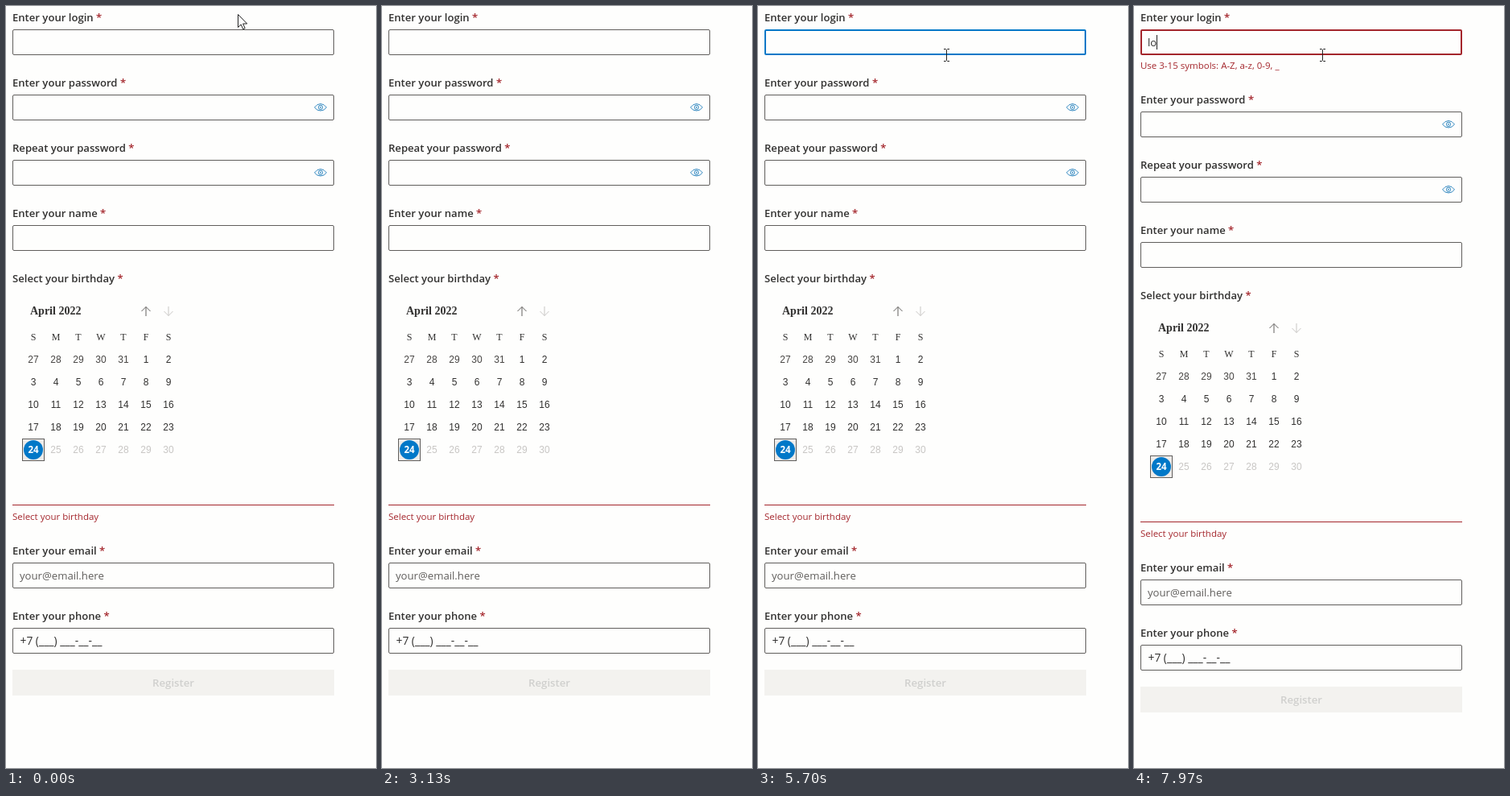
An HTML page that plays this animation: 460x946 px, repeating every 8 s.

```html
<!DOCTYPE html>
<html lang="en">
<head>
<meta charset="utf-8">
<title>Registration form</title>
<style>
  :root {
    --paper: #fefefd; --ink: #323130; --soft: #605e5c; --edge: #605e5c;
    --faint: #c8c6c4; --tint: #f3f2ef; --cell: #edebe9; --blue: #0078c8; --red: #a4262c;
  }
  html, body { margin: 0; width: 100%; height: 100%; overflow: hidden; background: var(--paper); }
  svg { display: block; width: 100%; height: 100%; }
  text { font-family: "Open Sans", "Noto Sans", sans-serif; font-size: 13.15px; fill: var(--ink); white-space: pre; }
  .label { font-size: 13.1px; font-weight: 600; }
  .star { fill: var(--red); }
  .hint { font-size: 11.5px; fill: var(--red); }
  .placeholder { fill: var(--soft); }
  .phone { font-size: 13.8px; }
  .box { fill: none; stroke: var(--edge); }
  .mid { text-anchor: middle; }
  .month { font: bold 14px "Liberation Serif", serif; }
  .weekday { font: 12px "Liberation Serif", serif; }
  .day { font: 12px "Liberation Sans", sans-serif; }
  .outer { fill: #484644; }
  .off { fill: var(--faint); }
  .today { font-size: 11.5px; font-weight: 700; fill: #fff; }
  .register { font-weight: 600; font-size: 13.2px; fill: #d0d0ce; }
  .icon { fill: none; stroke-width: 1; }
  .eye { stroke: #2f86bf; }

  .anim, .anim * { animation-duration: 8s; animation-iteration-count: infinite; animation-timing-function: step-end; }
  #lower { animation-name: shift; }
  #login { animation-name: outline; }
  #ring { fill: none; stroke-width: 2; animation-name: ring; }
  #hint { animation-name: slide; }
  #caret { fill: #222; animation: blink 8s infinite step-end, advance 8s infinite step-end; }
  #first { animation-name: typeFirst; }
  #second { animation-name: typeSecond; }
  #arrow { animation-name: arrow; animation-timing-function: ease-in-out; }
  #beam { animation-name: beam; animation-timing-function: ease-out; }

  @keyframes shift { 0% { transform: none } 90.81%, 100% { transform: translateY(21px) } }
  @keyframes outline { 0% { opacity: 1 } 48.75%, 100% { opacity: 0 } }
  @keyframes ring {
    0% { stroke: transparent }
    48.75% { stroke: var(--blue) }
    90.81%, 100% { stroke: var(--red) }
  }
  @keyframes slide {
    0% { opacity: 0; transform: translateY(-20px) }
    90.81% { opacity: 0; transform: translateY(-20px); animation-timing-function: cubic-bezier(.1, .9, .2, 1) }
    95.4%, 100% { opacity: 1; transform: none }
  }
  @keyframes blink {
    0%, 55.4%, 68.6%, 81.9% { opacity: 0 }
    48.75%, 62%, 75.25%, 88.5%, 100% { opacity: 1 }
  }
  @keyframes advance {
    0% { transform: none }
    88.5% { transform: translateX(3px) }
    95%, 100% { transform: translateX(11px) }
  }
  @keyframes typeFirst { 0% { visibility: hidden } 88.5%, 100% { visibility: visible } }
  @keyframes typeSecond { 0% { visibility: hidden } 95%, 100% { visibility: visible } }
  @keyframes arrow {
    0%, .4% { transform: translate(288px, 10px); opacity: 1 }
    2.6% { transform: translate(300px, -25px); opacity: 1 }
    43% { transform: translate(254px, -25px); opacity: 1 }
    47% { transform: translate(236px, 28px); opacity: 1; animation-timing-function: step-start }
    47.01%, 100% { transform: translate(236px, 28px); opacity: 0 }
  }
  @keyframes beam {
    0% { transform: translate(236px, 28px); opacity: 0; animation-timing-function: step-end }
    47% { transform: translate(236px, 28px); opacity: 1 }
    48.5%, 52.5% { transform: translate(232px, 56px); opacity: 1 }
    54%, 100% { transform: translate(234px, 61px); opacity: 1 }
  }
</style>
</head>
<body>
<svg id="stage" viewBox="0 0 460 946" xmlns="http://www.w3.org/2000/svg"></svg>
<script>
  const text = (x, y, kind, value) => `<text x="${x}" y="${y}" class="${kind}">${value}</text>`;
  const label = (y, value) => text(8, y, 'label', `${value} <tspan class="star">*</tspan>`);
  const box = (y, id = '') => `<rect ${id && `id="${id}"`} class="box" x="8.5" y="${y + .5}" width="399" height="31" rx="1.5"/>`;
  const field = (y, title, inner = '') => label(y + 19, title) + box(y + 29) + inner;
  const eye = y => `<g class="icon eye" transform="translate(391 ${y})">
    <path d="M-7.5 .5Q-4.5 -4 0 -4T7.5 .5Q4.5 4.5 0 4.5T-7.5 .5Z"/><circle cy=".3" r="2.6"/>
    <circle cy=".3" r=".6"/></g>`;

  function calendar() {
    let out = text(30, 383, 'month', 'April 2022');
    out += `<path class="icon" stroke="var(--edge)" d="M174 385V373.5M168.5 379L174 373.5L179.5 379"/>
      <path class="icon" stroke="var(--faint)" d="M202 373V384.5M196.5 379L202 384.5L207.5 379"/>`;
    [...'SMTWTFS'].forEach((name, i) => out += text(34 + 28 * i, 415, 'weekday mid', name));
    out += `<rect x="20.5" y="537.5" width="27" height="27" fill="var(--cell)" stroke="var(--edge)"/>
      <circle cx="34" cy="551" r="12" fill="var(--blue)"/>`;
    for (let i = 0; i < 35; i++) {
      const day = i < 5 ? 27 + i : i - 4;
      const kind = i < 5 ? 'day outer' : day === 24 ? 'today' : day > 24 ? 'day off' : 'day';
      out += text(34 + 28 * (i % 7), 443 + 28 * Math.floor(i / 7), kind + ' mid', day);
    }
    return out;
  }

  document.getElementById('stage').innerHTML = `
    <g class="anim">
      ${label(19, 'Enter your login')}
      ${box(29, 'login')}
      <rect id="ring" x="9" y="30" width="398" height="30" rx="1"/>
      <text x="17" y="50"><tspan id="first">l</tspan><tspan id="second">o</tspan></text>
      <rect id="caret" x="17" y="36" width="1" height="18"/>
      <text id="hint" class="hint" x="8" y="78">Use 3-15 symbols: A-Z, a-z, 0-9, _</text>
      <g id="lower">
        ${field(81, 'Enter your password', eye(125.5))}
        ${field(162, 'Repeat your password', eye(206.5))}
        ${field(243, 'Enter your name')}
        ${label(343, 'Select your birthday')}
        ${calendar()}
        <path d="M8 619.5H408" stroke="var(--red)"/>
        ${text(8, 638, 'hint', 'Select your birthday')}
        ${field(662, 'Enter your email', text(17, 712, 'placeholder', 'your@email.here'))}
        ${field(743, 'Enter your phone', text(17.5, 793, 'phone', '+7 (___) ___-__-__'))}
        <rect x="8" y="824" width="400" height="32" fill="var(--tint)"/>
        ${text(208, 845, 'register mid', 'Register')}
      </g>
      <path id="arrow" d="M.5 .5V16.5L4.2 13L6.8 18.8L9.2 17.7L6.6 12H11.7Z" fill="#fff" stroke="#222"/>
      <path id="beam" d="M-3 -7.5H-.5L.5 -6.5L1.5 -7.5H4M.5 -6.5V6.5M-3 7.5H-.5L.5 6.5L1.5 7.5H4" fill="none" stroke="#222"/>
    </g>`;
</script>
</body>
</html>
```
